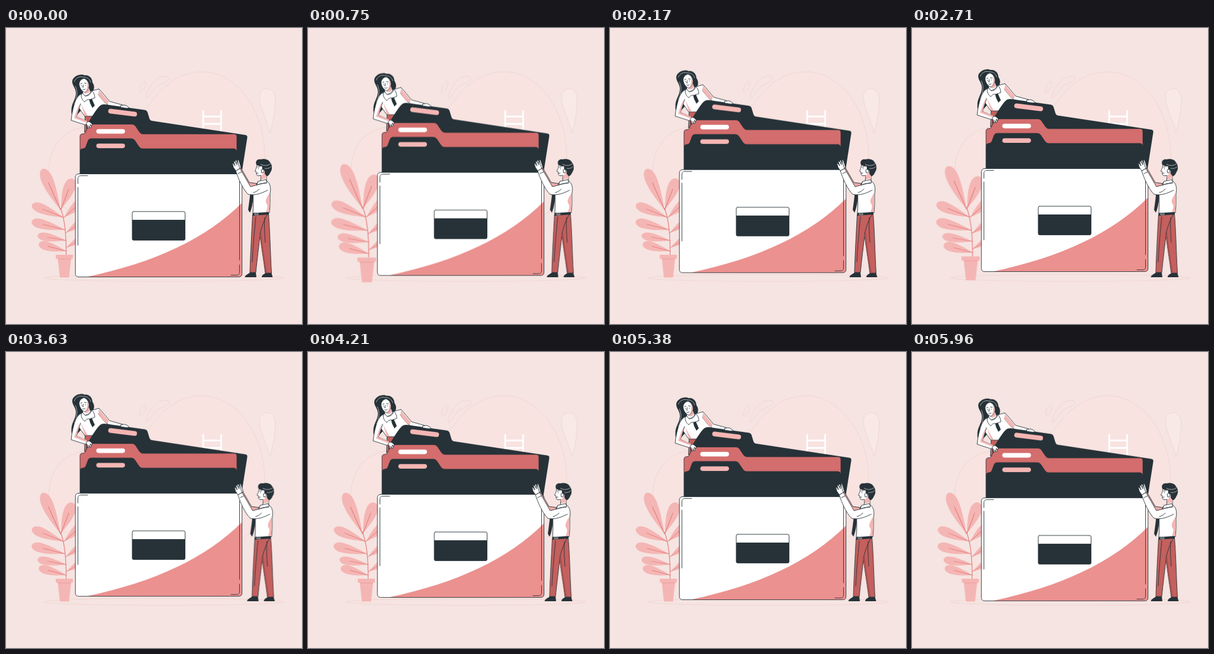
Animation, 500 px wide and 500 px high, one loop 6 s. Source, as an HTML page without scripts:

```html
<!DOCTYPE html>
<html lang="en">
<head>
<meta charset="utf-8">
<title>Folder scene</title>
<style>
html, body { margin: 0; width: 100%; height: 100%; overflow: hidden; background: #f5e4e1; }
svg { display: block; width: 100vw; height: 100vh; }
.dark { fill: #263238; }
.white { fill: #fff; }
.red { fill: #d46d6d; }
.cloth { fill: #c4605e; }
.shade { fill: #a94f4e; }
.rose { fill: #eb918f; }
.soft { fill: #f4b6b4; }
.ink { stroke: #263238; stroke-width: .9; stroke-linejoin: round; stroke-linecap: round; }
.line { fill: none; }
.faint { fill: none; stroke: #f0cfcc; stroke-width: .7; }
.vein { fill: none; stroke: #e57f7d; stroke-width: 1.2; stroke-linecap: round; }
.rails { fill: none; stroke: #fff; stroke-width: 2.8; }
.shine { fill: none; stroke: #fff; stroke-width: .6; }
.lift, .pulse, .shake { animation: 6s linear infinite; }
.lift { animation-name: lift; }
.pulse { animation-name: pulse; transform-origin: 90px 329px; }
.shake { animation-name: shake; }
@keyframes lift {
  50% { transform: translateY(-10px); }
}
@keyframes pulse {
  0%, 30%, 40%, 60%, 100% { transform: scale(1); }
  10%, 50% { transform: scale(1.1); }
}
@keyframes shake {
  0%, 100% { transform: translateX(0); }
  10%, 90% { transform: translateX(-1px); }
  20%, 80% { transform: translateX(2px); }
  30%, 50%, 70% { transform: translateX(-4px); }
  40%, 60% { transform: translateX(4px); }
}
</style>
</head>
<body>
<svg viewBox="0 0 500 500">
  <defs>
    <g id="leaf">
      <path class="soft" d="M0 0C12-4 28-11 44-10C52-9 57-4 56 1C55 8 47 11 39 10C26 9 12 4 0 0Z"/>
      <path class="vein" d="M0 0L37 0"/>
    </g>
  </defs>

  <g class="backdrop">
    <path class="faint" style="fill:#f8e3e1" d="M72 255C70 205 92 166 150 166C215 165 235 137 246 124C268 94 295 74 332 74C388 75 436 135 437 218C437 265 425 302 398 316H130C95 310 73 285 72 255Z"/>
    <path class="faint" d="M226 109C224 104 228 93 234 90C239 91 236 104 226 109Z"/>
    <path class="faint" d="M237 119C235 110 247 91 258 84C268 80 277 81 275 86C272 93 260 93 252 101C246 108 242 117 237 119Z"/>
    <path class="faint" style="fill:#f8e9e6" d="M446 177C442 158 428 133 428 116C429 105 437 101 445 103C454 106 456 118 454 133C453 151 449 166 446 177Z"/>
    <ellipse class="faint" cx="267" cy="422" rx="202" ry="6"/>
    <path class="rails" d="M333 139V180M363.300 139V180M333 149.500H363M333 162H363"/>
  </g>

  <g class="pulse">
    <path class="vein" d="M101.500 384C102 350 99 322 92 304"/>
    <use href="#leaf" transform="translate(92 307) rotate(-114) scale(1.34 .98)"/>
    <use href="#leaf" transform="translate(93 306) rotate(-69) scale(.98 .98)"/>
    <use href="#leaf" transform="translate(97 320) rotate(-158) scale(1.02 .82)"/>
    <use href="#leaf" transform="translate(98 320) rotate(-42) scale(.85 .8)"/>
    <use href="#leaf" transform="translate(100 341) rotate(-166) scale(1.04 .8)"/>
    <use href="#leaf" transform="translate(101 346) rotate(-34) scale(.8 .7)"/>
    <use href="#leaf" transform="translate(102 359) rotate(-170) scale(.88 .68)"/>
    <use href="#leaf" transform="translate(102 371) rotate(-31) scale(.75 .65)"/>
    <use href="#leaf" transform="translate(102 377) rotate(-165) scale(.86 .74)"/>
    <path class="soft" d="M84 383H113V389.500H110L106.500 421.500H91L87.500 389.500H84Z"/>
    <path style="fill:#eda5a3" d="M87.500 389.500H110L109.800 391H87.700Z"/>
  </g>

  <g class="lift">
    <g class="woman">
      <path class="dark" d="M125 79C117 80 111 86 112 92C113 99 119 103 118 112C117 122 110 128 110.500 140C110 146 112 149 117 150L126 140L128 118L147 107C150 101 149 96 146 92C146 84 139 79 133 80C130 78.500 128 78.500 125 79Z"/>
      <path class="shine" d="M115 91C118 84 124 81 131 83C138 83 142 87 143 92M117 98C122 108 120 117 115 128"/>
      <path class="cloth ink" d="M134 147H146L150 176H133Z"/>
      <path class="white ink" d="M126 112C121 115 118 120 117 126L133 149H146L160 131H176L157 103L146 106Z"/>
      <path class="soft" d="M126 126L133 148H138C133 141 129 133 126 126Z"/>
      <path class="white ink" d="M157 103C162 108 169 117 175 124L197 130L194 136L172 130C166 126 160 118 156 112"/>
      <path class="soft" d="M157 105C162 110 168 118 173.500 124L172 129C165 126 160 118 156 112Z"/>
      <path class="white ink" d="M129 103L130 114C135 116 141 112 143 108L139 98Z"/>
      <path class="soft" d="M132 109C136 108 139 105 140 102L142 107C139 111 135 112 132 109Z"/>
      <path class="white ink" d="M132 85C127 86 123.500 90 123.500 95C124 101 128 107 132.500 108.500C137 108 140 103 140 97C140 92 137 87 132 85Z"/>
      <path class="soft" d="M137 90C140 93 140.500 98 139 102C138 105 136 107 134 108C137 103 138 97 137 90Z"/>
      <path class="ink line" d="M126 94.500L128.500 93.500M132.500 93L135.500 93.500M127.500 97.200V97.800M134 96.500V97.100M130.500 96L129.500 100H131M129.500 103.500C131 105 133 104 134 103"/>
      <path class="white ink" d="M129 110L127 113C127 118 129 122 133 125C135 122 138 120 142 121L150 118C150 113 148 109 145 106C143 112 139 115 134 115Z"/>
      <path class="dark" d="M140.500 121L145 119.500L150 131L146 135L142 127Z"/>
      <path class="white ink" d="M118 121C114 131 111 145 110 156L135 164L138 158L119 150L126 128"/>
      <path class="soft" d="M125 127L119 150L137 157L136 160L115 152C118 143 121 134 125 127Z"/>
    </g>

    <path class="dark" d="M136 164L143 153C147 147 153 137 157 133C160 129.500 163 128.500 167 129L231 138C236 138.500 238 139.500 239 142L242 152C243 155 244 156.500 248 157L403 180.500C407 181 408 182.500 407.500 185.500L398 246V260H136Z"/>
    <rect class="soft" x="172.500" y="139" width="49" height="8" rx="4" transform="rotate(7 197 143)"/>
    <path class="white ink" d="M194 131L200 130C204 131 207 133 208 135C204 136 200 135 194 134Z"/>

    <path class="red ink" d="M125 260V183C125 180 127 178.800 130 178.800C133 178.800 134 177 135 174L139 166C140 163.500 142 162.500 145 162.500H212C215 162.500 217 163.500 219 166L225 175C227 178 229 179 232 179H385C388.500 179 390 180.500 390 184V260Z"/>
    <rect class="white" x="152.500" y="170.800" width="48.500" height="7.600" rx="3.800"/>
    <path class="dark" d="M125 260V208C125 205 127 203.500 130 203.500C133 203 134 202 135 199L138 191C139 188 141 186.500 144 186.500H211C214 186.500 216 187.500 218 190L224 199C226 202 228 203.500 231 203.500H384C388 203.500 390 206 390 209V260Z"/>
    <rect class="soft" x="152.500" y="195.300" width="48.500" height="7.600" rx="3.800"/>
    <path class="white ink" d="M135 162L138 158C142 158 145 161 146 164L145 165L142 163L144 168L142 169L140 165V169H138L137 164Z"/>

    <rect class="white" x="117.200" y="246.500" width="281.500" height="174" rx="5"/>
    <path class="rose" d="M136 420.500C252 396 337 356.500 398.700 295.300V415C398.700 419 397 420.500 393 420.500Z"/>
    <rect class="ink line" x="117.200" y="246.500" width="281.500" height="174" rx="5"/>
    <path class="ink line" d="M121.500 263V255C121.500 251 123 249.500 127 249.500H138M121.500 269V367M394.500 259V392M394.500 400V412C394.500 416 393 417.500 389 417.500H380"/>
    <rect class="dark ink" x="213.200" y="310" width="89.300" height="48.500" rx="2.500"/>
    <path class="white" d="M213.700 324V312.500Q213.700 310.500 215.700 310.500H300Q302 310.500 302 312.500V324Z"/>
  </g>

  <g class="shake">
    <path class="ink" style="fill:#f0a9a6" d="M391 238L396 235L411 261L426 263L422 274L409 270Z"/>
    <path class="white ink" d="M391 238L389 231L387 224L389 223L392 229L391 222L393 223L395 229L397 236Z"/>
    <path class="cloth ink" d="M428 325L443.500 314C446 345 446.500 380 448.500 414H438C435 390 431 368 428.500 346Z"/>
    <path class="cloth ink" d="M416.500 316L442 314C437 322 432 335 429.500 346C427 370 424 392 422 413H412C413 380 415 345 416.500 316Z"/>
    <path class="shade" d="M428.800 350L431.500 345C433 368 437 392 441 413.500H438.300C435 390 431 368 428.800 350Z"/>
    <path class="ink line" d="M437 320C436 335 437 348 438 362M422 319C420 340 417 370 416 395"/>
    <path class="dark" d="M403.500 421C404 417 409 416 412 413H422L423 421ZM432 421C432 417 436 416 438 414H448.500L450.500 421Z"/>
    <path class="white ink" d="M425 261L440 258C446 262 448 269 446 280V296C446 303 445 308 445 312L417 313C418 300 418 285 417 276Z"/>
    <path class="soft" d="M445 279C440 287 437 292 440 297C443 300 441 306 439 311H444.500C445 306 445.500 300 445.500 295Z"/>
    <path class="dark" d="M414 268L419 267L418 276C418 290 416 303 412 312L409 307C411 294 412 284 413 275Z"/>
    <path class="dark" d="M416.500 312.500L444 311V315L416.500 317Z"/>
    <path class="shine" d="M420 313.300H426V315.500H420Z"/>
    <path class="white ink" d="M440 262C434 262 425 265 413 268C407 258 401 247 395 237L388 241C392 254 400 272 409 281C421 284 434 278 442 274"/>
    <path class="ink line" d="M392 246L398 243M418 278C422 277 425 275 428 272"/>
    <path class="white ink" d="M388 241L384 235L382.500 229L384 228.500L387 233L384.500 225.500L386.500 225L390 231L389.500 226H391L395 237Z"/>
    <path class="white ink" d="M424 230C424 236 421 240 420.500 242L423 243C422.500 247 424 250 427 249.500L431 249L430 260L440 258V245L438 230Z"/>
    <path class="soft" d="M431 249C434 248 436 245 437 242L440 246V254L431 256Z"/>
    <path class="dark" d="M423 231C420.500 226 424 221 430 222C436 220 444 222 446 227C450 231 450 239 447 243C445.500 247 443 250 440.500 250.500L437 246C438 241 435 238 433 239.500L432.500 233.500C429 234 426 233 423 231Z"/>
    <path class="white ink" d="M431.500 239.500C434.500 237 437.500 241 434.500 245L432 244.500Z"/>
    <path class="ink line" d="M425 235L428 234.500M426.500 237.300V238M423.500 245.500L426 245"/>
    <path class="shine" d="M430 230C437 234 444 232 447 229M437 237C441 238 445 237 448 234"/>
    <path class="white ink" d="M426 259L439 256L441 261L430 263L424 265Z"/>
  </g>
</svg>
</body>
</html>
```
